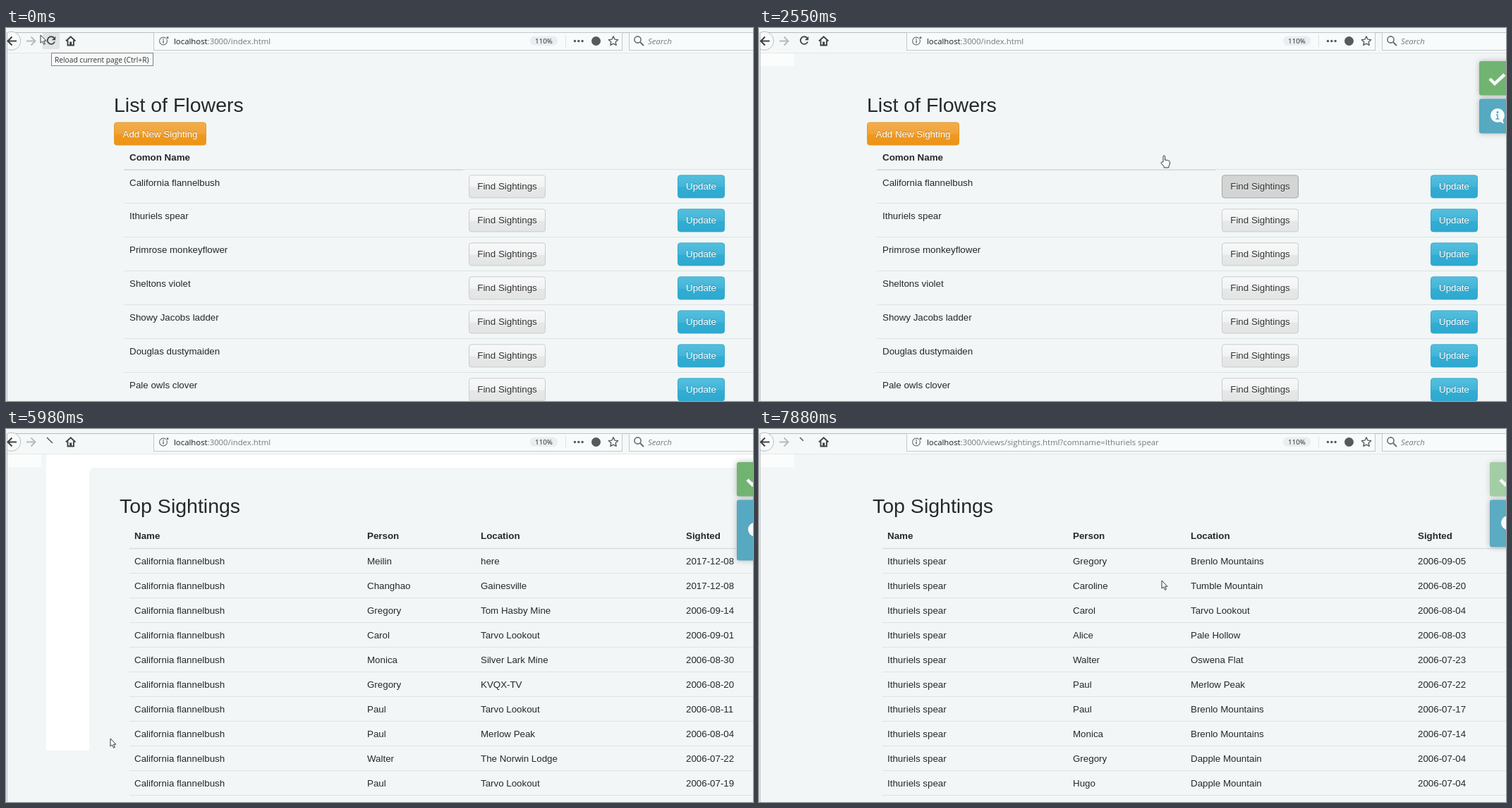
An HTML page for the animation above (8 s loop, 1059x529 px).

```html
<!DOCTYPE html>
<html lang="en">
<head>
<meta charset="utf-8">
<title>List of Flowers</title>
<style>
html, body { margin: 0; width: 100%; height: 100%; overflow: hidden; background: #f2f6f7; }
svg { display: block; width: 1059px; height: 529px; font: 13.33px "Liberation Sans", Arial, sans-serif; fill: #25292b; }
.ui { font-family: "Open Sans", "Noto Sans", sans-serif; }
.bold { font-weight: bold; }
.big { font-size: 28.5px; }
text { white-space: pre; }
</style>
</head>
<body>
<svg viewBox="0 0 1059 529" xmlns="http://www.w3.org/2000/svg">
  <defs>
    <linearGradient id="gray" x2="0" y2="1"><stop stop-color="#f8f9f9"/><stop offset=".5" stop-color="#f1f2f3"/><stop offset=".55" stop-color="#e6e7e7"/><stop offset="1" stop-color="#e3e4e4"/></linearGradient>
    <linearGradient id="blue" x2="0" y2="1"><stop stop-color="#55bfdd"/><stop offset=".5" stop-color="#43b5d8"/><stop offset=".55" stop-color="#31add3"/><stop offset="1" stop-color="#2fa8ce"/></linearGradient>
    <linearGradient id="orange" x2="0" y2="1"><stop stop-color="#f3ae4c"/><stop offset=".5" stop-color="#f0a338"/><stop offset=".55" stop-color="#ee991f"/><stop offset="1" stop-color="#ee9314"/></linearGradient>
    <filter id="glow" x="-30%" y="-30%" width="160%" height="160%"><feDropShadow dx="0" dy="0" stdDeviation="4.5" flood-color="#999" flood-opacity=".7"/></filter>
  </defs>
  <g id="page"></g>
  <g id="toolbar"></g>
  <g id="pointer"></g>
</svg>
<script>
const LOOP = 8000;
const STEP = 126.7, STEP_START = 375; // the screen refreshes in even steps
const RELOAD_CLICK = 400;

const flowers = ['California flannelbush', 'Ithuriels spear', 'Primrose monkeyflower', 'Sheltons violet',
  'Showy Jacobs ladder', 'Douglas dustymaiden', 'Pale owls clover'];

const flannelbush = { flower: flowers[0], columns: [182, 512, 673, 964], rows: [
  'Meilin|here|2017-12-08', 'Changhao|Gainesville|2017-12-08', 'Gregory|Tom Hasby Mine|2006-09-14',
  'Carol|Tarvo Lookout|2006-09-01', 'Monica|Silver Lark Mine|2006-08-30', 'Gregory|KVQX-TV|2006-08-20',
  'Paul|Tarvo Lookout|2006-08-11', 'Paul|Merlow Peak|2006-08-04', 'Walter|The Norwin Lodge|2006-07-22',
  'Paul|Tarvo Lookout|2006-07-19'] };
const spear = { flower: flowers[1], columns: [182, 445, 612, 934], rows: [
  'Gregory|Brenlo Mountains|2006-09-05', 'Caroline|Tumble Mountain|2006-08-20', 'Carol|Tarvo Lookout|2006-08-04',
  'Alice|Pale Hollow|2006-08-03', 'Walter|Oswena Flat|2006-07-23', 'Paul|Merlow Peak|2006-07-22',
  'Paul|Brenlo Mountains|2006-07-17', 'Monica|Brenlo Mountains|2006-07-14', 'Gregory|Dapple Mountain|2006-07-04',
  'Hugo|Dapple Mountain|2006-07-04'] };

// click: navigation starts; page: new content appears. Loads without a table show the flower list.
const loads = [
  { click: -LOOP, page: -LOOP, quiet: true },
  { click: RELOAD_CLICK, page: 839 },
  { press: 2400, click: 2650, page: 2900, table: flannelbush },
  { click: 5820, page: 6070 },
  { click: 7465, page: 7590, table: spear }
];

const home = { x: 49, y: 10 };
const moves = [
  { from: 1100, to: 1400, x: 800, y: 222 },
  { from: 1500, to: 1700, x: 1040, y: 205 },
  { from: 1700, to: 2300, x: 574, y: 181 },
  { from: 3400, to: 4170, x: 259, y: 377 },
  { from: 4180, to: 4800, x: 144, y: 453 },
  { from: 5350, to: 5580, x: 148, y: 439 },
  { from: 6050, to: 7000, x: 571, y: 215 }
];

const clamp = v => Math.min(1, Math.max(0, v));
const ease = v => v * v * (3 - 2 * v);

function cursorAt(t) {
  return moves.reduce((p, m) => {
    const k = ease(clamp((t - m.from) / (m.to - m.from)));
    return { x: p.x + (m.x - p.x) * k, y: p.y + (m.y - p.y) * k };
  }, home);
}

const text = (x, y, s, attrs = '') => `<text x="${x}" y="${y}" ${attrs}>${s}</text>`;
const rect = (x, y, w, h, fill, attrs = '') => `<rect x="${x}" y="${y}" width="${w}" height="${h}" fill="${fill}" ${attrs}/>`;
const path = (d, stroke, width = 1, fill = 'none', attrs = '') =>
  `<path d="${d}" stroke="${stroke}" stroke-width="${width}" fill="${fill}" ${attrs}/>`;
const solid = (d, fill) => path(d, 'none', 0, fill);
const circle = (x, y, r, fill, attrs = '') => `<circle cx="${x}" cy="${y}" r="${r}" fill="${fill}" ${attrs}/>`;
const rule = (x, y, color = '#dde2e4', width = 1) => path(`M${x} ${y}H1059`, color, width);

function button(x, y, w, label, fill, border, color = '#fff') {
  const light = color === '#fff';
  const caption = (dy, ink) => text(x + w / 2, y + 21 + dy, label, `text-anchor="middle" fill="${ink}"`);
  return rect(x + .5, y + .5, w - 1, 32, fill, `rx="3.5" stroke="${border}"`) +
    (light ? caption(-1, 'rgba(0,0,0,.25)') : caption(1, 'rgba(255,255,255,.75)')) + caption(0, color);
}

const rowTop = i => 208.4 + 48 * i;

function hoveredButton({ x, y }) {
  const px = x / .81, py = y / .82;
  const row = flowers.findIndex((_, i) => py >= rowTop(i) && py <= rowTop(i) + 33);
  const kind = px > 656 && px < 765 ? 'find' : px > 952 && px < 1019 ? 'update' : '';
  return row >= 0 && kind ? kind + row : null;
}

function flowerList(withRows, hot, pressed) {
  let out = text(153, 119, 'List of Flowers', 'class="big"') +
    button(153, 133.5, 131, 'Add New Sighting', 'url(#orange)', '#e69a2e') +
    text(175, 188, 'Comon Name', 'class="bold"') +
    rule(167, 200.5) + path('M167 201.5H648', '#d3d8da');
  if (!withRows) return out;
  flowers.forEach((name, i) => {
    const y = rowTop(i), find = hot === 'find' + i, update = hot === 'update' + i;
    const down = find && pressed;
    out += text(175, 223.5 + 47.9 * i, name) +
      button(656, y, 109, 'Find Sightings', down ? '#d3d4d4' : find ? '#e4e5e5' : 'url(#gray)',
        down ? '#a5a7a8' : find ? '#b5b7b8' : '#cacccd', '#333') +
      button(952, y, 67, 'Update', update ? '#2fa4ca' : 'url(#blue)', '#35a9cc') +
      rule(167, Math.round(248 + 47.9 * i) + .5);
  });
  return out;
}

function sightings({ flower, columns, rows }, withRows) {
  let out = text(161, 119, 'Top Sightings', 'class="big"') + rule(175, 169.5, '#d7dcde', 1.6);
  ['Name', 'Person', 'Location', 'Sighted'].forEach((s, c) => out += text(columns[c], 156, s, 'class="bold"'));
  if (!withRows) return out;
  rows.forEach((row, i) => {
    [flower, ...row.split('|')].forEach((s, c) => out += text(columns[c], 191.6 + 35 * i, s));
    out += rule(175, 204.5 + 35 * i);
  });
  return out;
}

// The blue toast fades in first, the green one follows.
function toasts(age, onList) {
  const blue = clamp((age - 48) / 220), green = clamp(1.3 * blue - .65) + (blue === 1 ? .35 : 0);
  const x = onList ? 1021 : 1036, height = onList ? 49 : blue < 1 ? 67 : 86;
  const box = (y, h, fill, opacity, mark) =>
    `<g opacity="${opacity}">${rect(x, y, 60, h, fill, 'rx="3" filter="url(#glow)"')}${mark}</g>`;
  const cx = x + 26, cy = 99.5 + height / 2;
  const bubble = circle(cx, cy, 10, '#f7fafb') + solid(`M${cx + 2} ${cy + 8}l7 4-2-7z`, '#f7fafb') +
    circle(cx, cy - 4.5, 1.5, '#56a9c1') + path(`M${cx - 2} ${cy - 1}h2v6m-2.5 0h5`, '#56a9c1', 1.6);
  return box(47, 48.5, '#71b471', green, path(`M${x + 15} 72l7 7 14-13`, '#f6faf6', 4.5)) +
    box(100.5, height, '#56a9c1', blue, bubble);
}

const whiteMargin = bottom => rect(57, 36, 1002, 19, '#fff') + rect(57, 36, 61, bottom - 36, '#fff') +
  solid('M118 61V55h6a6 6 0 0 0-6 6z', '#fff');

// The stop cross grows stroke by stroke after a click and shrinks back once the page is in.
function reloadIcon(t, load) {
  const growth = Math.min((t - load.click) / 130, (290 - t + load.page) / 50);
  if (growth > 0) {
    const first = 12 * clamp(growth / 1.5), second = 12 * clamp(growth - 1.5);
    return path(`M58 12l${first} ${first}M70 12l${-second} ${second}`, '#5c5e61', 1.7);
  }
  return path('M68.2 14.2A5.3 5.3 0 1 0 69 19.5', '#48494d', 1.9) + solid('M70.2 11.8v5.4h-5.4z', '#48494d');
}

function star(cx, cy, r) {
  const points = Array.from({ length: 10 }, (_, i) => {
    const a = i * Math.PI / 5 - Math.PI / 2, d = i % 2 ? r * .48 : r;
    return `${(cx + d * Math.cos(a)).toFixed(2)} ${(cy + d * Math.sin(a)).toFixed(2)}`;
  });
  return path(`M${points.join('L')}Z`, '#57595c', 1.4, 'none', 'stroke-linejoin="round"');
}

function toolbar(url, icon, hover) {
  const dark = '#3e4043', edge = '#c3c8ca', mid = '#6a6d70';
  return rect(2, 7, 1057, 28, '#f4f8f8') + path('M2 35.5H1059', '#e3e8e9') +
    path('M1.5 529V6.5H1059', '#b7bcbe') +
    path('M2 6.6A13 13 0 1 1 2 30', '#b9bec0', 1, '#f9fbfb') +
    path('M15 18.5H3M8.5 12.5L2.5 18.5l6 6', dark, 2) +
    path('M29 18.5h12M35.5 12.5l6 6-6 6', '#b5babb', 1.8) +
    (hover ? rect(52, 7, 24, 23, '#e1e5e6', 'rx="2"') : '') + icon +
    path('M85 18.5l6.7-6.3 6.7 6.3M87.5 17.5v7h8.4v-7', dark, 1.9) + rect(90.2, 19.5, 3, 5, dark) +
    rect(209.5, 6.5, 664, 25, '#f8fbfb', `stroke="${edge}"`) +
    circle(223, 18.5, 5.4, 'none', `stroke="${mid}" stroke-width="1.1"`) +
    rect(222.3, 17.5, 1.5, 4, mid) + rect(222.3, 15, 1.5, 1.5, mid) +
    circle(229, 13.8, 2, mid, 'stroke="#f8fbfb"') +
    text(238, 22.8, `localhost<tspan fill="#74797c">:3000/${url}</tspan>`, 'class="ui" font-size="11.37" fill="#1a1a1a"') +
    rect(743, 11.5, 39, 13.5, '#e9eef0', 'rx="6.5"') +
    text(762.5, 22, '110%', 'class="ui" font-size="9.8" text-anchor="middle"') +
    path('M793.5 10V27', '#dfe4e5') +
    [0, 1, 2].map(i => circle(806.5 + 5.3 * i, 18.5, 1.7, '#55575a')).join('') +
    circle(836.5, 18.5, 6.5, '#58595d') + star(861, 18.8, 7) +
    rect(883.5, 6.5, 190, 25, '#f8fbfb', `stroke="${edge}"`) +
    circle(895.5, 16.5, 4.6, 'none', `stroke="${mid}" stroke-width="1.6"`) + path('M899 20l5 5', mid, 1.9) +
    text(910, 22.8, 'Search', 'class="ui" font-size="11.4" font-style="italic" fill="#777b7e"') +
    (hover ? rect(64.5, 35.5, 144, 18, '#f8fafa', 'stroke="#7f8486"') +
      text(69, 48.8, 'Reload current page (Ctrl+R)', 'class="ui" font-size="10.2" fill="#333"') : '');
}

function pointer({ x, y }, hand) {
  const shape = hand
    ? 'M-1 9V1.2a1.3 1.3 0 0 1 2.6 0V6.5q1.8-1.2 2.4.3 1.8-.9 2.3.6 2-.6 2 1.2v3.4l-1.4 3.3v1.7H.2v-1.5L-4 10.6q0-2 1.6-1.4z'
    : 'M0 0v11.2l2.6-2.3 1.9 4.3 1.9-.8-1.9-4.2h3.4z';
  return path(shape, '#33373a', 1, '#fff', `transform="translate(${Math.round(x)} ${Math.round(y)})"`);
}

const layers = ['page', 'toolbar', 'pointer'].map(id => document.getElementById(id));
const drawn = [];

function render(time) {
  const t = time < RELOAD_CLICK ? 0 : STEP_START + STEP * Math.floor((time - STEP_START) / STEP);
  const hoverReload = time < RELOAD_CLICK;
  const active = loads.findLast(l => l.click <= time && (l.click <= t || l.click === RELOAD_CLICK));
  const shown = loads.findLast(l => l.page <= t);
  const { table } = shown, age = t - shown.page;
  const cursor = cursorAt(t);
  const hot = table ? null : hoveredButton(cursor);
  const pressed = loads.some(l => t >= l.press && t < l.page);
  const url = active.table ? 'views/sightings.html?comname=' + active.table.flower : 'index.html';

  const parts = [
    rect(0, 0, 1059, 529, '#f2f6f7') +
      (hoverReload ? '' : rect(2, 36, 48, 18, '#fbfcfc')) +
      (table && age > 400 ? whiteMargin(active === shown ? 103 : 456) : '') +
      (table ? sightings(table, age > 100) : flowerList(age > 100, hot, pressed)) +
      (shown.quiet ? '' : toasts(age, !table)),
    toolbar(url, reloadIcon(t, active), hoverReload),
    pointer(cursor, hot)
  ];
  parts.forEach((markup, i) => {
    if (drawn[i] !== markup) layers[i].innerHTML = drawn[i] = markup;
  });
}

const start = performance.now();
function tick() {
  render((performance.now() - start) % LOOP);
  requestAnimationFrame(tick);
}
tick();
</script>
</body>
</html>
```
